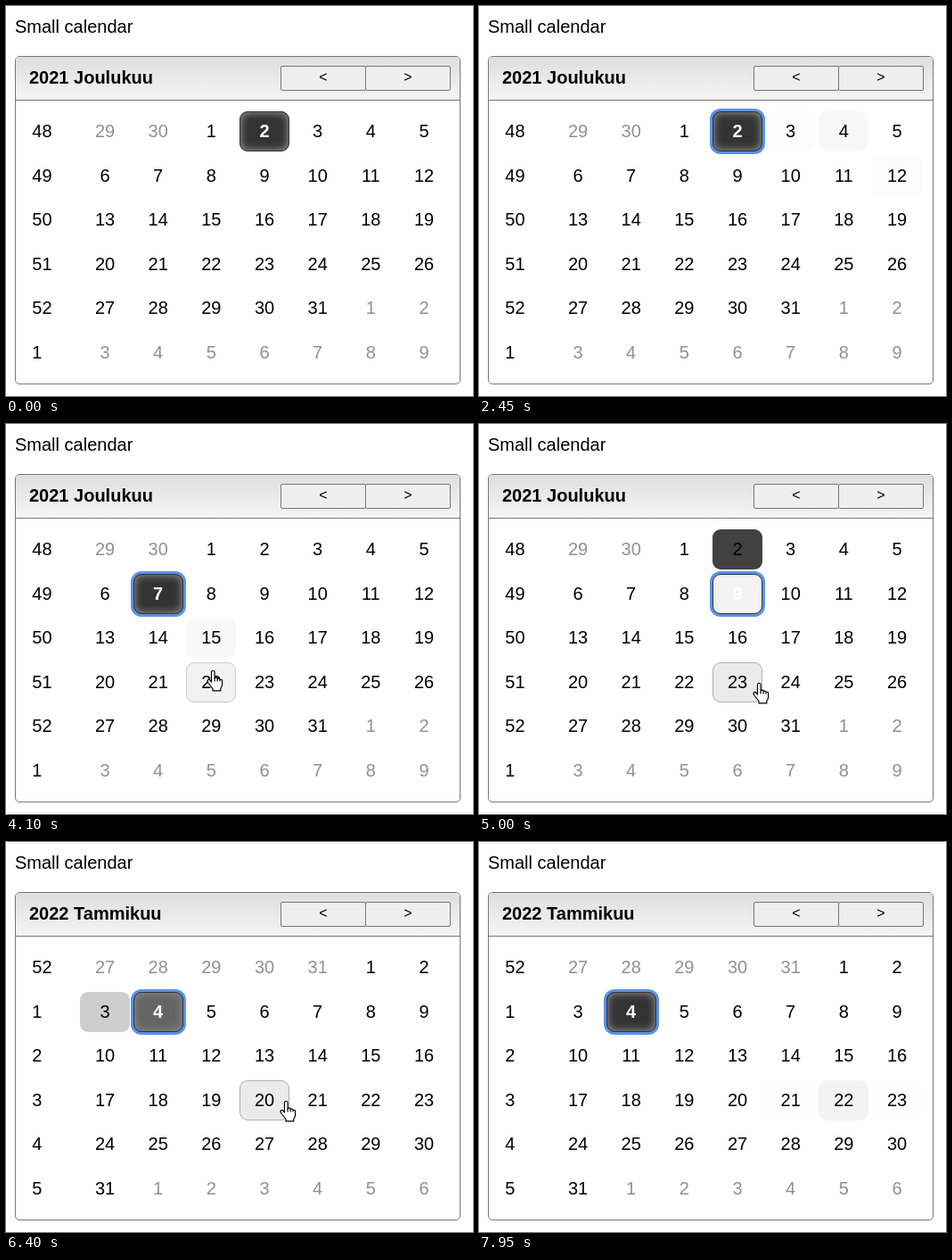
Animation, 524 px wide and 437 px high, one loop 8000 ms. Source, as an HTML page:

```html
<!DOCTYPE html>
<html lang="en">
<head>
<meta charset="utf-8">
<title>Small calendar</title>
<style>
html, body { margin: 0; width: 100%; height: 100%; overflow: hidden; background: #fff; }
body { position: relative; font: 20px/45px "Liberation Sans", Arial, sans-serif; color: #000; }
body * { position: absolute; box-sizing: border-box; white-space: nowrap; }
.label { left: 10px; top: 1px; }
.panel { left: 10px; top: 56px; width: 500px; height: 368px; border: 1px solid #777; border-radius: 5px; overflow: hidden; }
.head { left: 0; top: 0; width: 100%; height: 49px; border-bottom: 1px solid #777; background: linear-gradient(#dedede, #f5f5f5); }
.title { left: 15px; top: 1px; font-weight: bold; }
.button { top: 67px; width: 96px; height: 28px; border: 1px solid #767676; border-radius: 2px; background: #efefef; font-size: 16px; line-height: 24px; text-align: center; }
.cell { width: 56px; height: 45px; border: 1px solid transparent; border-radius: 9px; line-height: 43px; text-align: center; }
.week { padding-left: 5px; text-align: left; }
#hand { width: 20px; height: 26px; overflow: visible; }
</style>
</head>
<body>
<div class="label">Small calendar</div>
<div class="panel"><div class="head"><div class="title" id="title"></div></div></div>
<div class="button" style="left:308px">&lt;</div>
<div class="button" style="left:403px">&gt;</div>
<div id="grid"></div>
<svg id="hand" viewBox="0 0 20 26" stroke="#000" stroke-width="1.2" stroke-linejoin="round">
  <path fill="#fff" d="M5.5 13V2.3q0-1.8 1.8-1.8t1.8 1.8v6.2q3-1 3 .8 2.6-.6 2.9 1 2.6-.4 2.6 1.8v3.6q0 2.6-1.8 4.6v2.6H7v-2.4L2.2 14.5q-2-2.8-.6-3.8 1.4-.8 2.8 1z"/>
  <path fill="none" d="M9.1 8.5v4M12.1 9.5v3M15 10.5v2"/>
</svg>
<script>
const LOOP = 8000, FADE = 200, NEXT_MONTH = 5830, FIRST_CLICK = 1850;
const LEFT = 23.33, TOP = 118, STEP_X = 59.67, STEP_Y = 49.5;
const title = document.getElementById('title');
const grid = document.getElementById('grid');
const hand = document.getElementById('hand');

const months = [
  { name: '2021 Joulukuu', month: 11, first: new Date(2021, 10, 29), weeks: [48, 49, 50, 51, 52, 1] },
  { name: '2022 Tammikuu', month: 0, first: new Date(2021, 11, 27), weeks: [52, 1, 2, 3, 4, 5] }
];

// Pointer visits: time, x, y of the fingertip
const visits = [
  [[690, 484, 288], [950, 250, 235], [1180, 75, 195], [1260, 37, 188], [1300, 58, 187], [1400, 100, 187],
   [1450, 70, 188], [1500, 54, 189], [1600, 130, 187], [1760, 290, 160], [1830, 303, 144], [2280, 303, 144], [2440, 468, 172]],
  [[3560, 480, 200], [3700, 370, 205], [3900, 228, 252], [4100, 231, 276], [4230, 314, 290], [7740, 314, 290], [7940, 454, 288]]
];

// Selections: day index in the grid, month, start time
const picks = [];
const pick = (at, day, month) => picks.push({ start: at, end: Infinity, day, month });
const delta = { U: -7, D: 7, L: -1, R: 1 };
function press(keys, at, gap, day, month) {
  for (const key of keys) {
    day += delta[key];
    pick(at, day, month);
    at += gap;
  }
}
pick(-1000, 3, 0);
press('DDLLU', 2640, 180, 3, 0);
pick(4280, 24, 0);
press('UUUDDDDR', 4470, 172, 24, 0);
pick(NEXT_MONTH, 5, 1);
press('RRRRRDDLLUU', NEXT_MONTH + 160, 160, 5, 1);
picks.forEach((p, i) => { if (picks[i + 1]) p.end = picks[i + 1].start; });

function pointer(t) {
  const path = visits.find(v => t >= v[0][0] && t < v[v.length - 1][0]);
  if (!path) return null;
  const i = path.findIndex(p => p[0] > t);
  const [t0, x0, y0] = path[i - 1], [t1, x1, y1] = path[i];
  const k = (t - t0) / (t1 - t0);
  return { x: x0 + (x1 - x0) * k, y: y0 + (y1 - y0) * k };
}

function cellAt(p) {
  if (!p) return -1;
  return Math.floor((p.y - TOP) / STEP_Y) * 8 + Math.floor((p.x - LEFT) / STEP_X);
}

const hovers = [];
for (let t = 0, last = -1; t < LOOP; t += 5) {
  const id = cellAt(pointer(t));
  if (id === last) continue;
  if (last >= 0) hovers[hovers.length - 1].end = t;
  if (id >= 0) hovers.push({ id, start: t, end: Infinity });
  last = id;
}

// The CSS "ease" curve
function ease(x) {
  if (x <= 0) return 0;
  if (x >= 1) return 1;
  const curve = (s, a, b) => 3 * (1 - s) ** 2 * s * a + 3 * (1 - s) * s * s * b + s ** 3;
  let lo = 0, hi = 1;
  for (let i = 0; i < 20; i++) {
    const mid = (lo + hi) / 2;
    if (curve(mid, .25, .25) < x) lo = mid; else hi = mid;
  }
  return curve(lo, .1, 1);
}

function level(spans, t) {
  return Math.max(0, ...spans.map(({ start, end }) =>
    ease((Math.min(t, end) - start) / FADE) * (1 - ease((t - end) / FADE))));
}

const mix = (a, b, k) => a + (b - a) * k;
const grey = v => `rgb(${v},${v},${v})`;

const cells = Array.from({ length: 48 }, (_, id) => {
  const el = document.createElement('div'), row = id >> 3, col = id & 7;
  el.className = col ? 'cell' : 'cell week';
  el.style.left = LEFT + col * STEP_X + 'px';
  el.style.top = TOP + row * STEP_Y + 'px';
  grid.append(el);
  return { el, row, col, day: row * 7 + col - 1, hovers: hovers.filter(h => h.id === id) };
});

let shown = -1;
function showMonth(m) {
  if (m === shown) return;
  shown = m;
  const { name, month, first, weeks } = months[m];
  title.textContent = name;
  for (const c of cells) {
    const date = new Date(first.getFullYear(), first.getMonth(), first.getDate() + c.day);
    c.el.textContent = c.col ? date.getDate() : weeks[c.row];
    c.ink = c.col && date.getMonth() !== month ? '#919191' : '#000';
    c.picks = c.col ? picks.filter(p => p.month === m && p.day === c.day) : [];
  }
}

function draw(t) {
  showMonth(t < NEXT_MONTH ? 0 : 1);
  const p = pointer(t), over = cellAt(p);
  const active = spans => spans.some(s => t >= s.start && t < s.end);
  cells.forEach((c, id) => {
    const hover = level(c.hovers, t), chosen = level(c.picks, t), on = active(c.picks), s = c.el.style;
    s.background = grey(mix(mix(255, 235, hover), 51, chosen));
    s.borderColor = on ? '#333' : c.col && id === over ? grey(mix(255, 176, hover)) : 'transparent';
    s.color = on ? '#fff' : c.ink;
    s.fontWeight = on ? 'bold' : 'normal';
    s.zIndex = on ? 1 : 0;
    s.boxShadow = on
      ? `inset 0 0 10px rgba(160,160,160,${chosen})` + (t >= FIRST_CLICK ? ', 0 0 0 3px #5a92e8' : '')
      : 'none';
  });
  hand.style.display = p ? 'block' : 'none';
  if (p) {
    hand.style.left = Math.round(p.x - 7) + 'px';
    hand.style.top = Math.round(p.y) + 'px';
  }
}

const begin = performance.now();
function tick() {
  draw((performance.now() - begin) % LOOP);
  requestAnimationFrame(tick);
}
tick();
</script>
</body>
</html>
```
